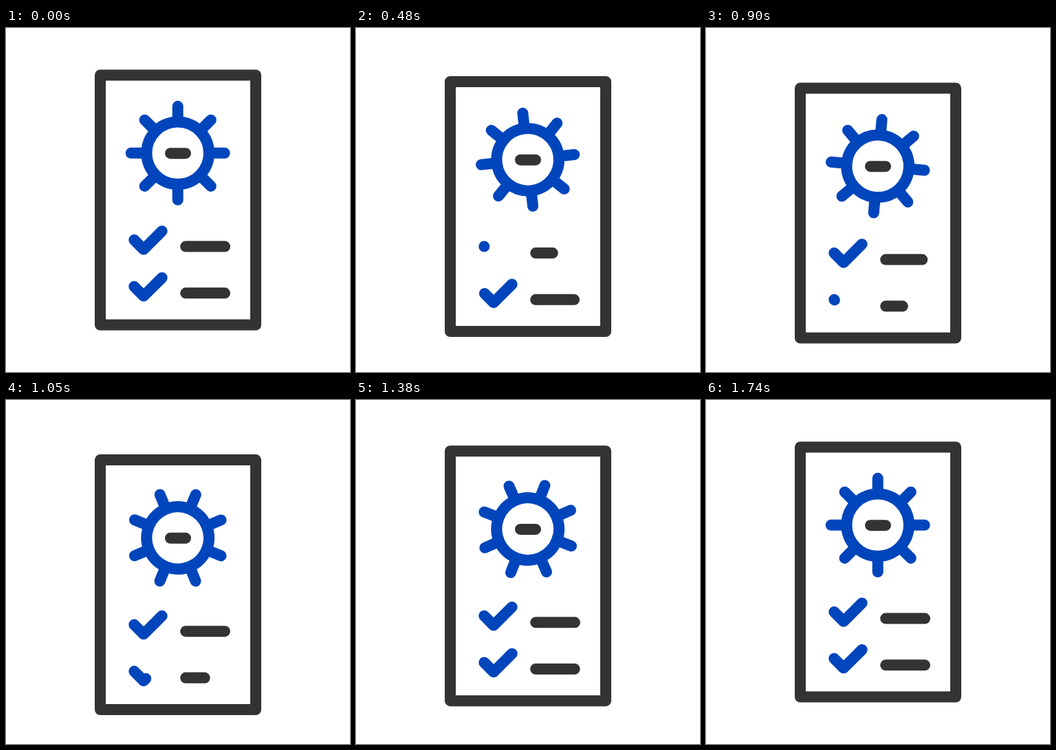
Animation of 500 by 500 pixels, one loop 1830 ms. Source, as an HTML page:

```html
<!DOCTYPE html>
<html lang="en">
<head>
<meta charset="utf-8">
<title>Checklist</title>
<style>
html, body { margin: 0; height: 100%; overflow: hidden; background: #fff; }
svg { display: block; width: 100%; height: 100%; }
g { fill: none; stroke-width: 16; stroke-linecap: round; stroke-linejoin: round; }
.dark { stroke: #333; }
.blue { stroke: #0045bb; }
</style>
</head>
<body>
<svg viewBox="0 0 500 500">
  <g id="page" class="dark">
    <rect x="137" y="68.5" width="226" height="363"/>
    <path d="M239 182.2H261"/>
    <path class="bar"/>
    <path class="bar"/>
    <g id="gear" class="blue"><circle r="45.3"/></g>
    <g class="blue">
      <path class="check" pathLength="100" d="M186.3 308L200 321.8L226.7 295.2"/>
      <path class="check" pathLength="100" d="M186.3 375.8L200 389.6L226.7 363"/>
    </g>
  </g>
</svg>
<script>
const LOOP = 1830, STEP = 30;
const page = document.getElementById('page');
const gear = document.getElementById('gear');
const bars = document.querySelectorAll('.bar');
const checks = document.querySelectorAll('.check');

for (let a = 0; a < 360; a += 45) {
  const tooth = document.createElementNS('http://www.w3.org/2000/svg', 'path');
  tooth.setAttribute('d', 'M0 -46V-68');
  tooth.setAttribute('transform', `rotate(${a})`);
  gear.append(tooth);
}

// cubic-bezier(.5, 0, .5, 1) between two times
function ease(t, from, to) {
  const x = Math.min(1, Math.max(0, (t - from) / (to - from)));
  let lo = 0, hi = 1;
  for (let i = 0; i < 24; i++) {
    const s = (lo + hi) / 2;
    if (s * (1.5 - 1.5 * s + s * s) < x) lo = s; else hi = s;
  }
  return x === 0 || x === 1 ? x : lo * lo * (3 - 2 * lo);
}

// the line shortens, then grows back
function drawBar(bar, y, t, out0, out1, in0, in1) {
  const end = 318 - 32.2 * (ease(t, out0, out1) - ease(t, in0, in1));
  bar.setAttribute('d', `M261.2 ${y}H${end}`);
}

// the tick is wiped from its start, then drawn again
function drawCheck(check, t, out0, turn, in1) {
  const wiping = t < turn;
  const start = wiping ? 100 * ease(t, out0, turn) : 0;
  const length = wiping ? 100 - start : 100 * ease(t, turn, in1);
  check.style.visibility = length > 0.01 ? 'visible' : 'hidden';
  check.setAttribute('stroke-dasharray', `${length} 300`);
  check.setAttribute('stroke-dashoffset', -start);
}

function draw(now) {
  const t = Math.floor(now % LOOP / STEP) * STEP;
  const drop = 19 * (ease(t, 60, 900) - ease(t, 966, 1650));
  page.setAttribute('transform', `translate(0 ${drop})`);
  gear.setAttribute('transform', `translate(249.7 181.8) rotate(${360 * ease(t, 65, 1712)})`);
  drawBar(bars[0], 317.6, t, 30, 480, 522, 1034);
  drawBar(bars[1], 385.3, t, 412, 897, 937, 1425);
  drawCheck(checks[0], t, 44, 465, 883);
  drawCheck(checks[1], t, 437, 858, 1276);
}

const begin = performance.now();
function tick() {
  draw(performance.now() - begin);
  requestAnimationFrame(tick);
}
tick();
</script>
</body>
</html>
```
